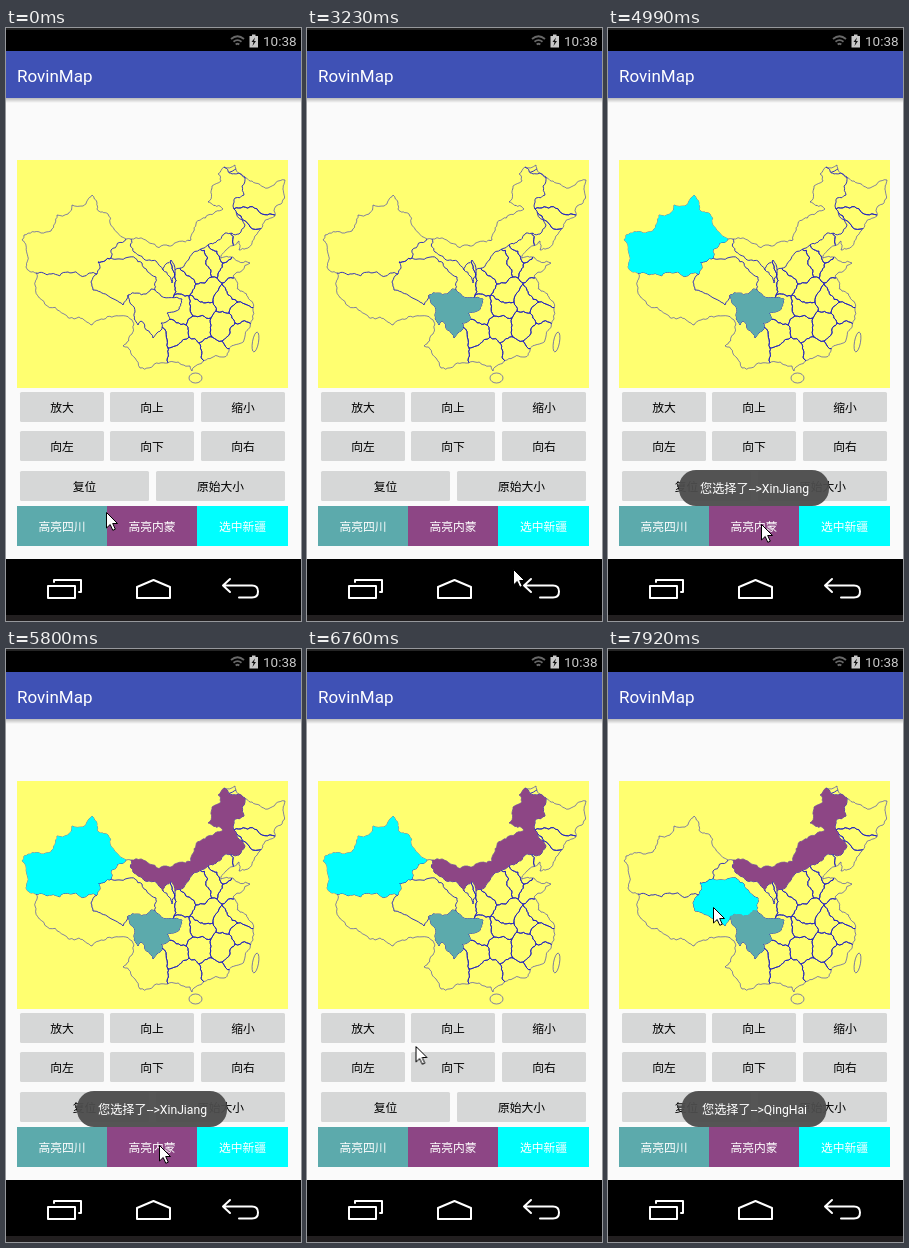
Animation, 295 px wide and 593 px high, one loop 8000 ms. Source, as an HTML page:

```html
<!DOCTYPE html>
<html lang="zh">
<head>
<meta charset="utf-8">
<title>RovinMap</title>
<style>
html, body { margin: 0; width: 100%; height: 100%; overflow: hidden; background: #fafafa; }
svg { display: block; width: 295px; height: 593px; }
text { font-family: Roboto, "Noto Sans CJK SC", "Noto Sans CJK", sans-serif; }
.label { font-size: 11.8px; font-weight: 500; text-anchor: middle; }
.toast { font-size: 12.2px; fill: #fff; text-anchor: middle; }
.nav { fill: none; stroke: #fff; stroke-width: 2; stroke-linejoin: round; stroke-linecap: round; }
.wifi { fill: none; stroke: #686868; stroke-width: 1.8; }
.outer, .inner { fill: none; stroke: #2020c0; stroke-width: .75; stroke-linejoin: round; }
.outer { stroke-opacity: .75; }
.inner { stroke-width: .9; }
</style>
</head>
<body>
<svg viewBox="0 0 295 593">
  <defs>
    <linearGradient id="shade" x2="0" y2="1">
      <stop offset="0" stop-color="#000" stop-opacity=".26"/>
      <stop offset="1" stop-color="#000" stop-opacity="0"/>
    </linearGradient>
    <clipPath id="land"></clipPath>
  </defs>
  <rect width="295" height="593" fill="#fafafa"/>
  <rect width="295" height="23" fill="#000"/>
  <rect width="295" height="2" fill="#242424"/>
  <rect y="23" width="295" height="47" fill="#3f51b5"/>
  <rect y="70" width="295" height="5" fill="url(#shade)"/>
  <text x="11" y="53.500" font-size="17" fill="#fff">RovinMap</text>
  <path class="wifi" d="M225 11Q231.500 5.500 238 11M227.500 13.700Q231.500 10.500 235.500 13.700M229.700 16.500Q231.500 15 233.300 16.500"/>
  <path d="M243.500 8H246V6.500H249.500V8H252V19.500H243.500Z" fill="#c8c8c8"/>
  <path d="M249 9.500L245.500 14H247.500L246.500 18L250 13H248Z" fill="#111"/>
  <text x="257" y="18" font-size="13.500" fill="#c8c8c8">10:38</text>
  <rect x="11" y="132" width="271" height="228" fill="#ffff70"/>
  <g id="map"></g>
  <g id="keys"></g>
  <rect y="531" width="295" height="56" fill="#000"/>
  <rect y="587" width="295" height="6" fill="#221f20"/>
  <g class="nav">
    <path d="M42 558H69V570H42ZM48 554V552H75V564H73"/>
    <path d="M131 570V559L147.500 552L164 559V570Z"/>
    <path d="M224 551L217 557.500L224 564M217 557.500H246Q252 557.500 252 563.500T246 569.500H233"/>
  </g>
  <g id="toasts"></g>
  <path id="cursor" d="M.5 .5V16L4.200 12.500L6.800 18.300L9.300 17.200L6.700 11.500H11.500Z" fill="#fff" stroke="#000"/>
</svg>
<script>
const LOOP = 8000, TICK = 130;
const YELLOW = '#ffff70', TEAL = '#5caaac', PLUM = '#8d4685', CYAN = '#00ffff';
const $ = id => document.getElementById(id);

function add(parent, tag, attrs, text) {
  const el = document.createElementNS('http://www.w3.org/2000/svg', tag);
  for (const k in attrs) el.setAttribute(k, attrs[k]);
  if (text) el.textContent = text;
  parent.append(el);
  return el;
}

// Each row [ms, value, n]: reach the value in n jumps, one per tick, then hold
function track(el, prop, start, rows) {
  const frames = [{ offset: 0, [prop]: start, easing: 'step-end' }];
  let now = start;
  for (const [t, value, n = 1] of rows) {
    frames.push({ offset: t / LOOP, [prop]: now, easing: `steps(${n}, jump-start)` });
    frames.push({ offset: Math.min(1, (t + n * TICK) / LOOP), [prop]: value, easing: 'step-end' });
    now = value;
  }
  frames.push({ offset: 1, [prop]: now });
  el.animate(frames, { duration: LOOP, iterations: Infinity });
}

// ---- Map: key points joined by fractal lines ----
const pts = s => s.split(' ').map(p => p.split(',').map(Number));
const back = line => [...line].reverse();

// Midpoint displacement, the same in both directions
function rough(a, b) {
  const dx = b[0] - a[0], dy = b[1] - a[1];
  if (Math.hypot(dx, dy) < 3) return [b];
  const r = Math.sin((a[0] + b[0]) * 12.9 + (a[1] + b[1]) * 78.2) * 4375.5;
  const side = dx < 0 || (dx === 0 && dy < 0) ? -1 : 1;
  const d = (r - Math.floor(r) - .5) * .36 * side;
  const m = [(a[0] + b[0]) / 2 - dy * d, (a[1] + b[1]) / 2 + dx * d];
  return [...rough(a, m), ...rough(m, b)];
}

function pathOf(line) {
  const all = line.flatMap((p, i) => i ? rough(line[i - 1], p) : [p]);
  return 'M' + all.map(p => p.map(v => v.toFixed(1))).join('L');
}

const xjNorth = pts('30,245 20,239 16,212 18,207 35,205 45,203 51,187 62,186 66,177 77,178 86,167 91,175 91,181 102,186 104,195 120,211');
const xjEast = pts('120,211 105,222 105,230 92,234');
const xjQinghai = pts('92,234 94,240 91,246');
const xjTibet = pts('91,246 62,244 45,246 30,245');
const qhNorth = pts('92,234 105,230 136,235 150,249 149,262');
const qhSichuan = pts('149,262 145,261 140,266 122,267');
const qhTibet = pts('122,267 117,277 101,267 87,262 85,254 91,246');
const scSouth = pts('149,262 155,268 176,271 170,283 161,285 164,291 155,295 156,301 147,310 135,293 132,297 129,284 122,267');
const imNorth = pts('125,211 163,218 185,212 190,196 202,187 217,181 214,178 202,174 206,158 215,153 212,146 218,139');
const imEast = pts('218,139 239,149 236,158 238,167 229,170 227,178 239,197');
const imSouth = pts('239,197 233,206 219,205 198,220 183,231 169,242 165,232 157,242 150,233 128,224 125,211');
const gap = pts('120,211 125,211');
const tibet = pts('30,245 29,257 58,286 68,291 73,289 86,297 93,292 127,294');
const yunnan = pts('127,294 126,306 117,318 129,330 134,340 168,334');
const northEast = pts('218,139 229,137 246,153 262,160 279,152 275,176 270,178 269,188 252,204');
const coast = pts('252,204 233,222 233,213 222,220 215,230 227,229 244,235 227,248 242,269 247,280 247,291 238,312 218,329 188,339 186,343 184,338 168,334');
const ningxia = pts('157,242 163,248 166,255 169,242');

const map = $('map');
const shape = (arcs, attrs, parent = map) => add(parent, 'path', { d: pathOf(arcs.flat()) + 'Z', ...attrs });
const stroke = (line, kind) => add(map, 'path', { d: pathOf(line), class: kind });

// The smaller provinces are the Voronoi cells of their centres
const centres = pts('156,254 177,252 192,243 205,234 212,224 226,242 201,263 231,262 220,272 237,285 196,280 175,284 194,298 216,297 231,307 169,304 144,319 179,324 206,325 236,207 252,194 254,172');

function cell(c) {
  let poly = pts('100,120 300,120 300,370 100,370');
  for (const o of centres) {
    if (o === c) continue;
    const nx = o[0] - c[0], ny = o[1] - c[1];
    const side = p => (p[0] - (c[0] + o[0]) / 2) * nx + (p[1] - (c[1] + o[1]) / 2) * ny;
    poly = poly.flatMap((p, i) => {
      const q = poly[(i + 1) % poly.length], a = side(p), b = side(q), k = a / (a - b);
      const cut = [p[0] + (q[0] - p[0]) * k, p[1] + (q[1] - p[1]) * k];
      return [...(a <= 0 ? [p] : []), ...(a * b < 0 ? [cut] : [])];
    });
  }
  return [...poly, poly[0]].map(p => p.map(Math.round));
}

shape([xjNorth, gap, imNorth, northEast, coast, back(yunnan), back(tibet)], {}, $('land'));
const cells = add(map, 'g', { 'clip-path': 'url(#land)' });
for (const c of centres) add(cells, 'path', { d: pathOf(cell(c)), class: 'inner' });

const areas = {
  xinjiang: [xjNorth, xjEast, xjQinghai, xjTibet],
  qinghai: [qhNorth, qhSichuan, qhTibet, back(xjQinghai)],
  sichuan: [scSouth, back(qhSichuan)],
  mongolia: [imNorth, imEast, imSouth],
  tibet: [tibet, pts('129,284 122,267'), qhTibet, xjTibet]
};
for (const k in areas) shape(areas[k], { fill: YELLOW });

for (const l of [xjNorth, gap, imNorth, northEast, coast, yunnan, tibet]) stroke(l, 'outer');
for (const l of [xjEast, xjQinghai, xjTibet, qhNorth, qhSichuan, qhTibet, scSouth, imEast, imSouth, ningxia]) stroke(l, 'inner');
add(map, 'ellipse', { cx: 189.5, cy: 350, rx: 6.5, ry: 5, class: 'outer' });
add(map, 'ellipse', { cx: 249.5, cy: 314, rx: 3, ry: 10, transform: 'rotate(10 249.5 314)', class: 'outer' });

const light = (name, fill, rows) => track(shape(areas[name], { fill, opacity: 0 }), 'opacity', 0, rows);
light('sichuan', TEAL, [[1840, 1]]);
light('xinjiang', CYAN, [[4020, 1], [7490, 0]]);
light('mongolia', PLUM, [[5800, 1]]);
light('qinghai', CYAN, [[7490, 1]]);

// ---- Buttons ----
function key(x, y, width, height, label, fill = '#d6d7d7', ink = '#000', rx = 1.5) {
  add($('keys'), 'rect', { x, y, width, height, rx, fill });
  add($('keys'), 'text', { x: x + width / 2, y: y + height / 2 + 4.6, class: 'label', fill: ink }, label);
}
[['放大', '向上', '缩小'], ['向左', '向下', '向右'], ['复位', '原始大小']].forEach((row, r) => {
  const step = 271.5 / row.length;
  row.forEach((s, c) => key(Math.floor(14.3 + c * step), 364 + Math.floor(r * 39.7), Math.floor(step - 6.5), 30, s));
});
[['高亮四川', TEAL], ['高亮内蒙', PLUM], ['选中新疆', CYAN]].forEach(([s, fill], c) => {
  const x = Math.round(11 + c * 90.2);
  key(x, 478, Math.round(101.2 + c * 90.2) - x, 40, s, fill, '#fff', 0);
});

// ---- Toasts ----
function toast(width, name, rows) {
  const g = add($('toasts'), 'g', { opacity: 0 });
  add(g, 'rect', { x: 146 - width / 2, y: 442, width, height: 36, rx: 17, fill: '#4c4c4c', 'fill-opacity': .95 });
  add(g, 'text', { x: 146.5, y: 464.5, class: 'toast' }, '您选择了-->' + name);
  track(g, 'opacity', 0, rows);
}
toast(150, 'XinJiang', [[4020, .12], [4170, 1, 3], [5950, .9], [6090, 0]]);
toast(145, 'QingHai', [[7640, 1, 3]]);
const slab = add($('toasts'), 'rect', { x: 71, y: 442, width: 150, height: 36, opacity: 0 });
track(slab, 'opacity', 0, [[6090, .73], [6340, 0, 2]]);

// ---- Pointer ----
const at = (x, y) => `translate(${x}px, ${y}px)`;
track($('cursor'), 'transform', at(100, 484), [
  [500, at(99, 483)], [650, at(78, 505), 2], [1450, at(78, 502), 2],
  [2810, at(161, 512), 3], [3230, at(251, 570), 2], [3490, at(236, 501), 3],
  [4570, at(151, 475), 2], [4840, at(153, 496), 2], [6340, at(142, 517)],
  [6640, at(75, 277), 2], [6910, at(103, 261)], [7060, at(105, 258), 2]
]);
</script>
</body>
</html>
```
